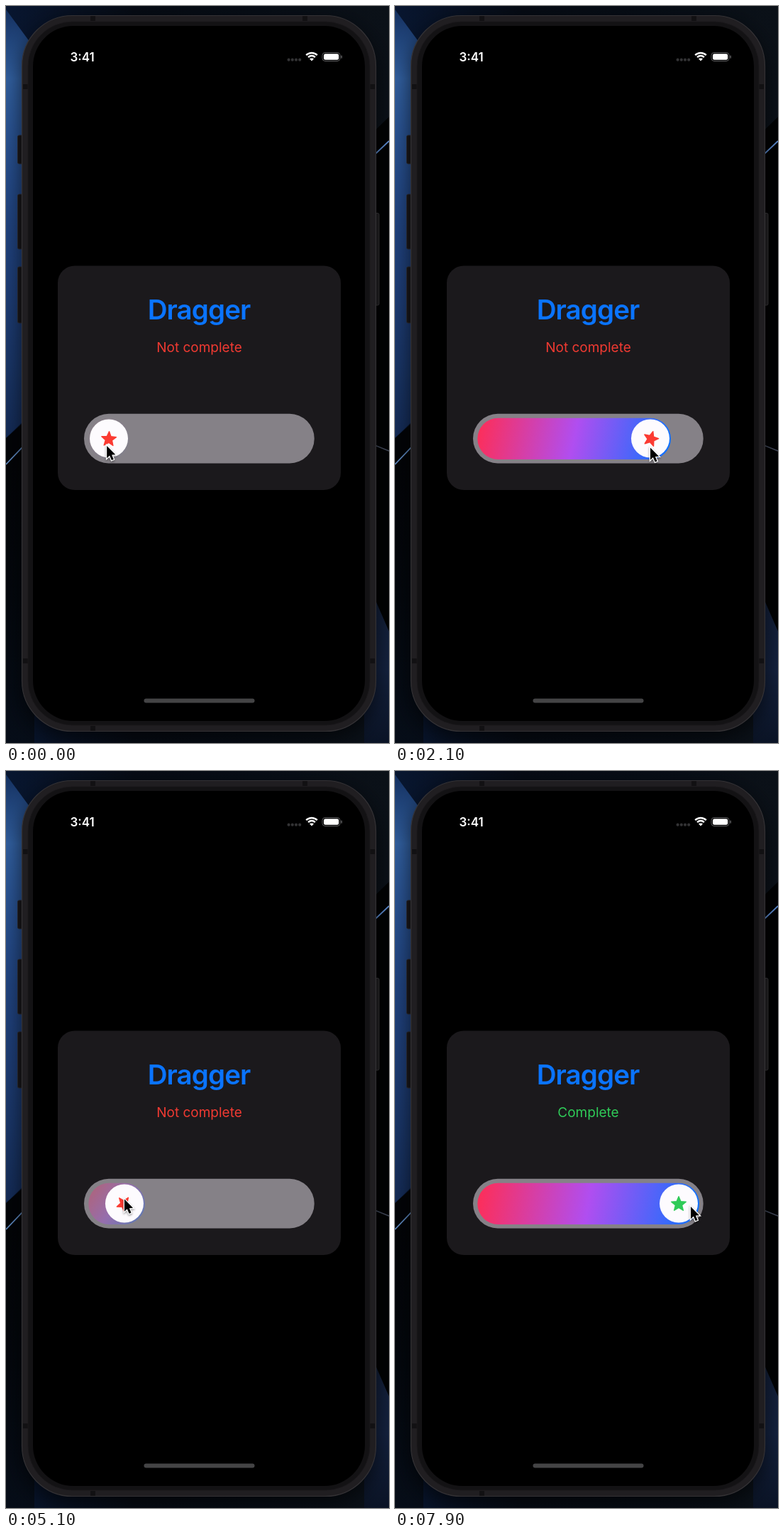
These frames come from a looping animation (540 px wide and 1037 px high, 8000 ms). An HTML page with a canvas:

```html
<!DOCTYPE html>
<html lang="en">
<head>
<meta charset="utf-8">
<title>Dragger</title>
<style>
  html, body { margin: 0; width: 100%; height: 100%; overflow: hidden; background: #000; }
  canvas { display: block; width: 540px; height: 1037px; }
</style>
</head>
<body>
<canvas width="540" height="1037"></canvas>
<script>
const ctx = document.querySelector('canvas').getContext('2d');
const LOOP = 8000, STEP = 100, RELEASE = 2950, COMPLETE = 7500;
const MIN_X = 143, MAX_X = 400, KNOB_Y = 608.5;
const RED = '#fb3b32', GREEN = '#2fcb58';

function ease(t, from, to) {
  const u = Math.min(1, Math.max(0, (t - from) / (to - from)));
  return u * u * (3 - 2 * u);
}

// Drag right, let go and spring back, then drag again to the end.
function poseAt(t) {
  const firstDrag = 145 + 238 * ease(t, 0, 2600);
  if (t < RELEASE) {
    const sway = -Math.cos(2 * Math.PI * t / 2800);
    return { knob: firstDrag, x: firstDrag + 2.8 * sway, y: 621.5 + 2.5 * sway };
  }
  if (t < 4400) {
    const k = (t - RELEASE) / 1000 * 11.4;
    return {
      knob: MIN_X + (firstDrag - MIN_X) * (1 + k) * Math.exp(-k),
      x: 381 - 238 * ease(t, 3100, 4200),
      y: 619 - 17 * ease(t, 3100, 3700)
    };
  }
  const x = MIN_X + 165 * ease(t, 4980, 5480) - 32 * ease(t, 5500, 6200) + 141 * ease(t, 6300, 7200);
  return { knob: Math.min(MAX_X, x), x, y: 602 + 8 * ease(t, 5000, 5600) + 3 * ease(t, 6300, 7200) };
}

// Colours are spread evenly along the line.
function gradient(x0, y0, x1, y1, ...colors) {
  const g = ctx.createLinearGradient(x0, y0, x1, y1);
  colors.forEach((color, i) => g.addColorStop(i / (colors.length - 1), color));
  return g;
}

function box(x0, y0, x1, y1, r, fill, stroke, width = 1) {
  ctx.beginPath();
  ctx.roundRect(x0, y0, x1 - x0, y1 - y0, r);
  if (fill) { ctx.fillStyle = fill; ctx.fill(); }
  if (stroke) { ctx.strokeStyle = stroke; ctx.lineWidth = width; ctx.stroke(); }
}

function disc(x, y, r, fill) {
  ctx.beginPath();
  ctx.arc(x, y, r, 0, 2 * Math.PI);
  ctx.fillStyle = fill;
  ctx.fill();
}

function poly(points, fill) {
  ctx.beginPath();
  points.forEach(([x, y]) => ctx.lineTo(x, y));
  ctx.closePath();
  if (fill) { ctx.fillStyle = fill; ctx.fill(); }
}

function line(x0, y0, x1, y1, color, width) {
  ctx.beginPath();
  ctx.moveTo(x0, y0);
  ctx.lineTo(x1, y1);
  ctx.strokeStyle = color;
  ctx.lineWidth = width;
  ctx.stroke();
}

function text(str, x, y, font, color, align = 'center', spacing = 0) {
  ctx.font = font + ' Inter, sans-serif';
  ctx.textAlign = align;
  ctx.letterSpacing = spacing + 'px';
  ctx.fillStyle = color;
  ctx.fillText(str, x, y);
}

function wallpaper() {
  ctx.fillStyle = gradient(0, 0, 540, 0, '#081630', '#060b14', '#070d16', '#0b1118');
  ctx.fillRect(0, 0, 540, 1037);
  // left: blue panel, dark gap, lit edge
  poly([[0, 5], [70, 100], [70, 540], [0, 608]],
    gradient(0, 0, 0, 610, '#132e5c', '#315f9f', '#274f8e', '#20437f', '#1d3c74', '#193566', '#142b56'));
  poly([[0, 608], [40, 572], [40, 1037], [0, 1037]], gradient(0, 640, 0, 1037, '#020407', '#03070d', '#060d18'));
  line(0, 645, 40, 603, '#5f8bc4', 1.8);
  // right: black panel, lit edges, blue corner
  poly([[505, 190], [540, 156], [540, 880], [505, 800]], '#010203');
  line(505, 223, 540, 190, '#5f8fd6', 1.8);
  line(505, 612, 540, 626, '#454c5e', 1.5);
  poly([[505, 800], [540, 880], [540, 1037], [505, 1037]], gradient(0, 830, 0, 1037, '#131f38', '#14223f', '#0a1325'));
}

function phone() {
  for (const [top, bottom] of [[182, 222], [265, 342], [367, 446]])
    box(16.5, top, 25, bottom, 2, '#19171a', '#2f2d31');
  box(518, 291.5, 526, 421, 2, '#222023', '#3a383b');
  ctx.save();
  ctx.shadowColor = 'rgba(0,0,0,.65)';
  ctx.shadowBlur = 30;
  ctx.shadowOffsetY = 10;
  box(22.5, 13.5, 521.5, 1020.5, 71, '#201e21');
  ctx.restore();
  box(22.5, 13.5, 521.5, 1020.5, 71, null, '#343235', 1.2);
  const band = (x, y) => box(x, y, x + 7, y + 7, 0, '#121113');
  for (const y of [110, 918]) { band(24, y); band(513, y); }
  for (const x of [119, 418]) band(x, 14);
  band(119, 1013);
  box(31, 22, 513, 1012, 63, '#131214', '#1a181b');
  box(38, 28, 506, 1006, 57, '#000');
}

function statusBar() {
  text('3:41', 90.5, 77.5, '600 17px', '#fff', 'left');
  for (let i = 0; i < 4; i++) disc(398.6 + i * 5.2, 75.7, 2.1, '#333335');
  ctx.strokeStyle = '#fff';
  ctx.lineWidth = 2.5;
  for (const r of [11, 6.9]) {
    ctx.beginPath();
    ctx.arc(431, 77, r, -Math.PI * .75, -Math.PI * .25);
    ctx.stroke();
  }
  poly([[431, 77.5], [428, 74.3], [429.5, 73.4], [432.5, 73.4], [434, 74.3]], '#fff');
  box(446, 65.5, 471, 77.5, 4, null, '#5c5c5e');
  box(448, 67.3, 469.2, 75.8, 2.4, '#fff');
  box(472.4, 69.5, 473.9, 73.7, 1, '#5c5c5e');
}

function homeIndicator(t) {
  const dim = ease(t, 3200, 3700) - ease(t, 3900, 4400);
  const shade = amount => `hsl(240 1% ${27 * (1 - amount * dim)}%)`;
  box(194.5, 974.5, 350.5, 980.5, 3, gradient(194, 0, 351, 0, shade(.4), shade(.7)));
}

function star(x, y, angle, color) {
  ctx.save();
  ctx.translate(x, y);
  ctx.rotate(angle);
  poly(Array.from({ length: 10 }, (_, i) => {
    const a = i * Math.PI / 5, r = i % 2 ? 4.8 : 10.8;
    return [r * Math.sin(a), 1 - r * Math.cos(a)];
  }), color);
  ctx.strokeStyle = color;
  ctx.lineWidth = 1.4;
  ctx.lineJoin = 'round';
  ctx.stroke();
  ctx.restore();
}

function slider(x, done) {
  const offset = x - MIN_X, right = x + 29;
  box(110, 573.8, 434.7, 643.5, 35, '#858187');
  ctx.globalAlpha = Math.min(1, offset / 65);
  box(116.3, 579.8, right, 638, 29.1, gradient(116, 580, right, 638, '#ff2d55', '#b04ef0', '#0a74ff'));
  ctx.globalAlpha = 1;
  disc(x, KNOB_Y, 27, '#fdfbfe');
  star(x, KNOB_Y, offset / (MAX_X - MIN_X) * 2 * Math.PI, done ? GREEN : RED);
}

function pointer(x, y) {
  ctx.save();
  ctx.translate(x, y);
  ctx.scale(.93, .93);
  ctx.shadowColor = 'rgba(0,0,0,.4)';
  ctx.shadowBlur = 3;
  ctx.shadowOffsetY = 1.5;
  poly([[0, 0], [0, 18.5], [4.2, 14.6], [7.2, 21.6], [10.3, 20.3], [7.4, 13.5], [13, 13.2]]);
  ctx.strokeStyle = '#fff';
  ctx.lineWidth = 2.8;
  ctx.stroke();
  ctx.shadowColor = 'transparent';
  ctx.fillStyle = '#000';
  ctx.fill();
  ctx.restore();
}

function draw(now) {
  const t = Math.floor(now % LOOP / STEP) * STEP;
  const { knob, x, y } = poseAt(t);
  const done = t >= COMPLETE;
  wallpaper();
  phone();
  statusBar();
  homeIndicator(t);
  box(73, 365.5, 472, 681, 24, '#1b191c');
  text('Dragger', 272, 440.7, '600 38.5px', '#0a74ff', 'center', -.9);
  text(done ? 'Complete' : 'Not complete', 272.5, 486.5, '400 19px', done ? GREEN : '#f03a32');
  slider(knob, done);
  pointer(x, y);
}

const start = performance.now();
function tick() {
  draw(performance.now() - start);
  requestAnimationFrame(tick);
}
tick();
</script>
</body>
</html>
```
